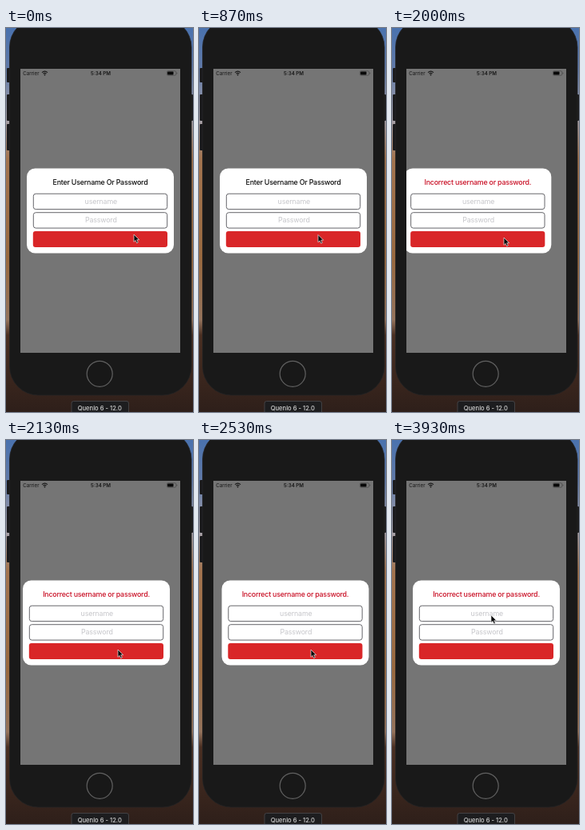
Write an HTML page that moves like this. It is 234 by 480 pixels and loops after 3.99 s.

```html
<!DOCTYPE html>
<html lang="en">
<head>
<meta charset="utf-8">
<title>Login shake</title>
<style>
html, body { margin: 0; width: 100%; height: 100%; overflow: hidden; background: #111; }
svg { display: block; width: 100vw; height: 100vh; }
text { font-family: Inter, "Liberation Sans", sans-serif; text-anchor: middle; }
.label { font-size: 8.9px; letter-spacing: -.17px; }
.title { font-weight: 500; letter-spacing: -.23px; }
.hint { fill: #c6c6ca; }
.status { font-size: 6.2px; fill: #161616; }
.field { fill: #fff; stroke: #66666b; stroke-width: 1; }
</style>
</head>
<body>
<svg viewBox="0 0 234 480" preserveAspectRatio="none">
  <defs>
    <linearGradient id="sky" x1="0" y1="0" x2="0" y2="1">
      <stop offset="0" stop-color="#4a72ae"/>
      <stop offset=".1" stop-color="#5f79a8"/>
      <stop offset=".24" stop-color="#a5a0a8"/>
      <stop offset=".34" stop-color="#a3744f"/>
      <stop offset=".6" stop-color="#99693f"/>
      <stop offset=".76" stop-color="#94735c"/>
      <stop offset=".8" stop-color="#4a2f22"/>
      <stop offset="1" stop-color="#2e1f1a"/>
    </linearGradient>
    <clipPath id="screen"><rect x="18" y="51" width="200" height="355"/></clipPath>
  </defs>

  <rect width="234" height="480" fill="url(#sky)"/>

  <g fill="#1a1a1c">
    <rect x="1" y="50" width="6" height="18" rx="1"/>
    <rect x="1" y="83" width="6" height="33" rx="1"/>
    <rect x="1" y="120" width="6" height="33" rx="1"/>
    <rect x="229" y="83" width="5" height="33" rx="1"/>
  </g>
  <rect x="4.5" y="-12" width="227.5" height="471" rx="36" fill="#191919" stroke="#242425" stroke-width=".8"/>
  <circle cx="117.2" cy="432.3" r="16" fill="#181818" stroke="#606060" stroke-width="1.2"/>

  <rect x="82" y="466.5" width="71.5" height="20" rx="2.5" fill="#1d1d1f" stroke="#4b4b4e" stroke-width=".8"/>
  <text x="117.3" y="478" font-size="7.6" font-weight="500" fill="#d6d6d6">Quenlo 6 - 12.0</text>

  <g clip-path="url(#screen)">
    <rect x="18" y="51" width="200" height="355" fill="#757575"/>
    <text class="status" x="31.4" y="59">Carrier</text>
    <path d="M45 55.6Q48.5 52.6 52 55.6M46.5 57.2Q48.5 55.5 50.5 57.2" fill="none" stroke="#161616" stroke-width="1.1"/>
    <circle cx="48.5" cy="58.6" r=".9" fill="#161616"/>
    <text class="status" x="118.5" y="59" font-weight="600">5:34 PM</text>
    <rect x="201.4" y="53.8" width="11.4" height="5.4" rx="1.4" fill="none" stroke="#404040" stroke-width=".6"/>
    <rect x="202.1" y="54.4" width="7.4" height="4.2" rx=".8" fill="#080808"/>
    <rect x="213.5" y="55.6" width=".8" height="1.9" rx=".4" fill="#404040"/>

    <g id="card">
      <rect x="26" y="175.5" width="184" height="106" rx="10.5" fill="#fff"/>
      <text id="title" class="label title" x="118" y="196.4"></text>
      <rect class="field" x="34.3" y="207.2" width="167.4" height="19.4" rx="3"/>
      <text class="label hint" x="118.8" y="220">username</text>
      <rect class="field" x="34.3" y="230.7" width="167.4" height="19.4" rx="3"/>
      <text class="label hint" x="118.8" y="243.4">Password</text>
      <rect x="33.8" y="254" width="168.2" height="20" rx="3" fill="#d92628"/>
    </g>
  </g>

  <path id="cursor" d="M0 0V9.3L2.1 7.4L3.6 10.8L5.3 10L3.8 6.7H6.7Z" fill="#050505" stroke="#e8e8e8" stroke-width=".7" stroke-linejoin="round"/>
</svg>

<script>
const LOOP = 3990, TICK = 200 / 3;
const SHAKE_AT = 2000, SHAKE_STEP = 75, SHAKE_STEPS = 8, POINT = 200 / 375;

// Each move runs between two ticks to (x, y), bowing out sideways on the way
const moves = [
  { from: 4, to: 11, x: 149, y: 258.5, bowX: 0, bowY: 0 },
  { from: 13, to: 20, x: 140, y: 262, bowX: 82, bowY: -124 },
  { from: 42, to: 45, x: 105, y: 206, bowX: 38, bowY: -20 },
  { from: 47, to: 50, x: 142, y: 252, bowX: -68, bowY: 8 },
  { from: 50, to: 55, x: 124, y: 219, bowX: 92, bowY: 36 }
];

const card = document.getElementById("card");
const title = document.getElementById("title");
const cursor = document.getElementById("cursor");
const mix = (a, b, u) => a + (b - a) * u;

function pointerAt(tick) {
  let x = 160, y = 258;
  for (const m of moves) {
    const u = Math.max(0, Math.min(1, (tick - m.from) / (m.to - m.from)));
    const bow = Math.sin(Math.PI * u);
    x = mix(x, m.x, u) + m.bowX * bow;
    y = mix(y, m.y, u) + m.bowY * bow;
  }
  return [x, y];
}

// Two full swings, then each pair half as wide
function swing(i) {
  if (i >= SHAKE_STEPS) return 0;
  const size = 20 / 2 ** Math.max(0, (i >> 1) - 1);
  return i % 2 ? size : -size;
}

function shakeAt(ms) {
  if (ms < 0) return 0;
  const pos = ms / SHAKE_STEP, i = Math.floor(pos);
  return mix(swing(i), swing(i + 1), pos - i) * POINT;
}

function draw(ms) {
  // The picture advances at 15 steps a second
  const tick = Math.min(59, Math.floor((ms % LOOP + 3.5) / TICK));
  const since = Math.round(tick * TICK / 10) * 10 - SHAKE_AT;
  const failed = since >= 0;
  const [x, y] = pointerAt(tick);
  title.textContent = failed ? "Incorrect username or password." : "Enter Username Or Password";
  title.setAttribute("fill", failed ? "#c90e24" : "#0c0c0c");
  card.setAttribute("transform", `translate(${shakeAt(since).toFixed(2)} 0)`);
  cursor.setAttribute("transform", `translate(${x.toFixed(2)} ${y.toFixed(2)})`);
}

const start = performance.now();
function loop() {
  draw(performance.now() - start);
  requestAnimationFrame(loop);
}
loop();
</script>
</body>
</html>
```
